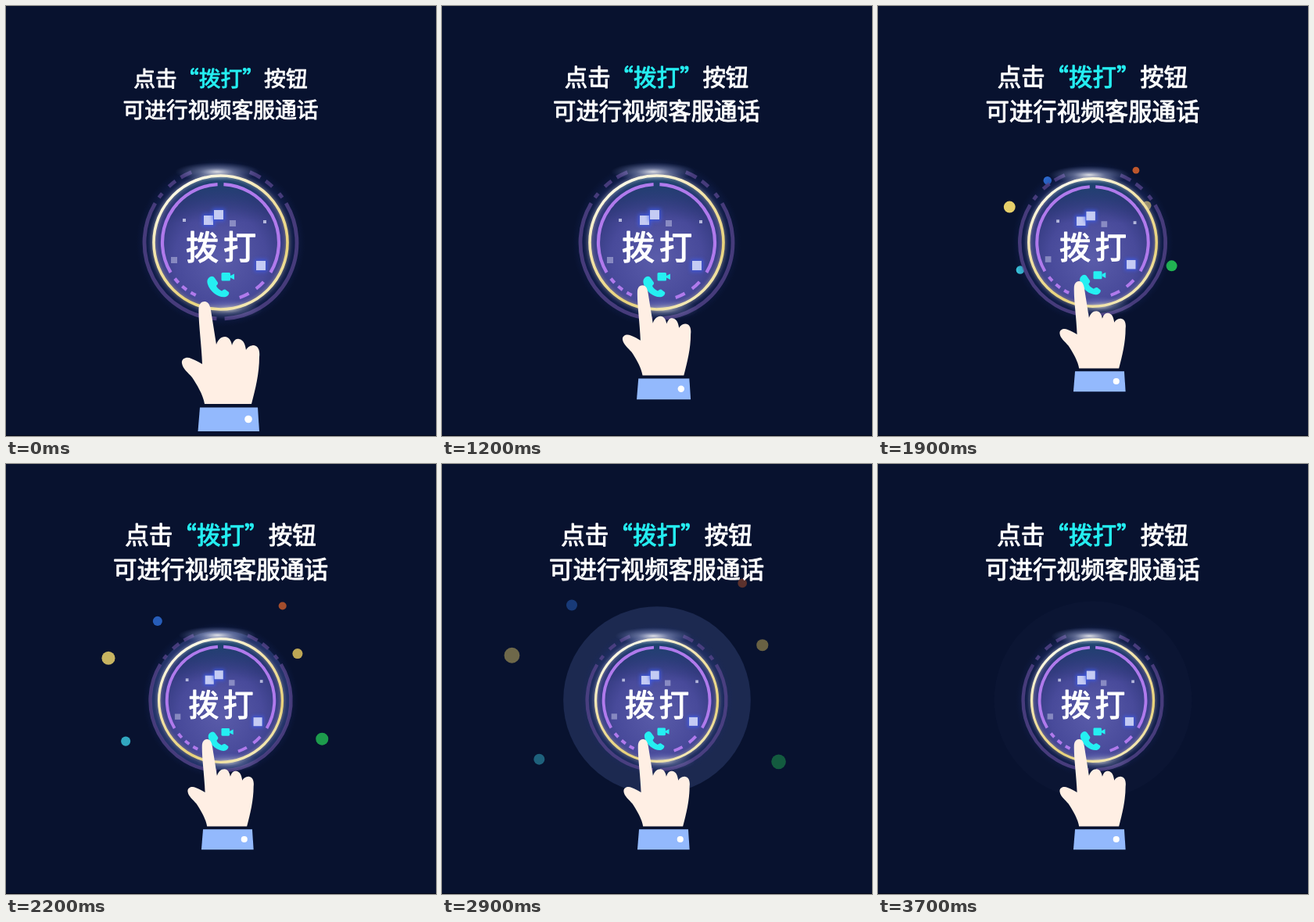
An HTML page for the animation above (3.8 s loop, 550 by 550 pixels).

```html
<!DOCTYPE html>
<html lang="zh-CN">
<head>
<meta charset="utf-8">
<title>拨打</title>
<style>
html, body { margin: 0; width: 100%; height: 100%; overflow: hidden; background: #08122f; }
svg { display: block; width: 100vw; height: 100vh; }
text, tspan { fill: currentColor; stroke: currentColor; }
text { font-family: "Noto Sans CJK SC", "Noto Sans CJK", sans-serif; color: #fff; stroke-width: .9; stroke-linejoin: round; }
.cyan { color: #25eff2; fill: #25eff2; }
</style>
</head>
<body>
<svg viewBox="0 0 550 550" lang="zh-CN">
  <defs>
    <radialGradient id="disc" cx=".5" cy=".62" r=".62">
      <stop offset="0" stop-color="#5a5caa"/>
      <stop offset=".55" stop-color="#484a9a"/>
      <stop offset="1" stop-color="#26306e"/>
    </radialGradient>
    <linearGradient id="teal" x1="0" y1="0" x2="0" y2="1">
      <stop offset="0" stop-color="#1b4a70" stop-opacity=".9"/>
      <stop offset=".35" stop-color="#1f2c66" stop-opacity="0"/>
    </linearGradient>
    <linearGradient id="gold" x1=".2" y1="0" x2=".75" y2="1">
      <stop offset="0" stop-color="#fffdf2"/>
      <stop offset=".4" stop-color="#f3e3a6"/>
      <stop offset=".75" stop-color="#e8d27a"/>
      <stop offset="1" stop-color="#f6edc0"/>
    </linearGradient>
    <radialGradient id="aura">
      <stop offset=".78" stop-color="#2c3f92" stop-opacity=".55"/>
      <stop offset="1" stop-color="#14245c" stop-opacity="0"/>
    </radialGradient>
    <radialGradient id="shine">
      <stop offset="0" stop-color="#fff" stop-opacity=".85"/>
      <stop offset=".4" stop-color="#c4cdf0" stop-opacity=".4"/>
      <stop offset="1" stop-color="#8f9fe0" stop-opacity="0"/>
    </radialGradient>
    <filter id="soft" x="-1" y="-1" width="3" height="3"><feGaussianBlur stdDeviation="2.5"/></filter>
    <filter id="edge" x="-.5" y="-.5" width="2" height="2"><feGaussianBlur stdDeviation=".7"/></filter>
  </defs>
  <rect width="550" height="550" fill="#08122f"/>
  <rect y="549" width="550" height="1" fill="#04081a"/>
  <circle id="halo" cx="275" cy="302" fill="#82a0ff"/>
  <g id="dots"></g>
  <g id="button">
    <circle cx="274.5" cy="302.5" r="108" fill="url(#aura)"/>
    <g id="outer" fill="none" stroke="#55448a" stroke-width="4.8" opacity=".8" filter="url(#edge)"></g>
    <circle cx="274.5" cy="302.5" r="86" fill="url(#disc)"/>
    <circle cx="274.5" cy="302.5" r="86" fill="url(#teal)"/>
    <ellipse cx="270" cy="212" rx="54" ry="12" fill="url(#shine)"/>
    <ellipse cx="285" cy="388" rx="44" ry="13" fill="url(#shine)" opacity=".6"/>
    <g fill="none" stroke="url(#gold)">
      <circle cx="274.5" cy="302.5" r="85.5" stroke-width="5" opacity=".4" filter="url(#soft)"/>
      <circle cx="274.5" cy="302.5" r="85.5" stroke-width="3.6" filter="url(#edge)"/>
    </g>
    <g id="inner" fill="none" stroke="#b07aec" stroke-width="4.2" filter="url(#edge)"></g>
    <g id="squares"></g>
    <text x="230" y="323.5" font-size="42" letter-spacing="6" style="stroke-width:1.4">拨打</text>
    <g class="cyan">
      <path d="M259 348C262 345 265 345 267 348L270.500 353C272 355 270 357 269 358C270 361 273 363 276 364.500C278 363 279 362 281 363L285 366C286 368 284 371 281 372C273 374 261 366 258 356C257 353 257 350 259 348Z"/>
      <rect x="275.500" y="341" width="11.500" height="10.500" rx="1.500"/>
      <path d="M287 345L292 342.500V350L287 347.500Z"/>
    </g>
  </g>
  <g id="title" text-anchor="middle" font-size="27.8">
    <text x="274.500" y="102.800">点击<tspan class="cyan">“拨打”</tspan>按钮</text>
    <text x="274.500" y="143.300">可进行视频客服通话</text>
  </g>
  <g id="hand">
    <path fill="#ffefe4" d="M254 509C252 497 244 484 238 475C233 469 226 464 225 457C224 451 231 448 237 451C243 453 247 456 251 458C250 432 246 405 246.500 388C246.500 381 250 378 254 378C259 378 261 383 262 389L269 433C271 427 275 423 280 423C285 423 288 428 289 434C291 428 294 425 298 426C304 427 306 433 307 440C309 436 313 434 317 434C323 435 325 441 324 449C324 470 319 490 314 509Z"/>
    <path fill="#93b9fd" d="M248 513.500H322L324 544H245.500Z"/>
    <circle cx="310" cy="528.500" r="4.800" fill="#fff"/>
  </g>
</svg>
<script>
const LOOP = 3800, STEP = 100, CX = 275, CY = 302;
const $ = id => document.getElementById(id);
const ramp = (t, a, b) => Math.min(1, Math.max(0, (t - a) / (b - a)));

function set(el, attrs) {
  for (const k in attrs) el.setAttribute(k, attrs[k]);
  return el;
}

function add(parent, tag, attrs) {
  const el = document.createElementNS("http://www.w3.org/2000/svg", tag);
  return $(parent).appendChild(set(el, attrs));
}

// Angles in degrees, clockwise from the right
function arc(ring, mid, span) {
  const at = deg => {
    const a = deg * Math.PI / 180;
    return `${274.5 + ring.r * Math.cos(a)} ${302.5 + ring.r * Math.sin(a)}`;
  };
  add(ring.id, "path", { d: `M${at(mid - span / 2)}A${ring.r} ${ring.r} 0 0 1 ${at(mid + span / 2)}` });
}

function dashes(ring, n, first, step, span, grow = 0) {
  for (let i = 0; i < n; i++) arc(ring, first + step * i, span + grow * i);
}

const outer = { id: "outer", r: 97.5 }, inner = { id: "inner", r: 74.5 };
dashes(outer, 2, 152, -124, 118);
dashes(outer, 3, 218, 12.5, 4, 2.5);
dashes(outer, 3, -38, -12.5, 4, 2.5);
dashes(inner, 2, 208, -236, 118);
dashes(inner, 3, 139, -10.5, 5.5);
dashes(inner, 2, 47.5, 18.5, 10);

function squares(size, opacity, glow, ...points) {
  const box = (x, y, s, more) =>
    add("squares", "rect", { x: x - s / 2, y: y - s / 2, width: s, height: s, ...more });
  for (const [x, y] of points) {
    if (glow) box(x, y, size + 4, { fill: "#3a5cf0", opacity: .7, filter: "url(#soft)" });
    box(x, y, size, { fill: "#e6e9fc", opacity, filter: "url(#edge)" });
  }
}
squares(12, .8, true, [259, 274], [272, 267], [326, 332]);
squares(8, .4, false, [290, 278], [215, 325]);
squares(4, .7, false, [228, 274], [331, 276]);

// Bezier flights from the button's centre: bend point, end point, final radius
const dots = [
  { fill: "#e6cf6a", bend: [-115, -61], end: [-194, -57], size: 10.2 },
  { fill: "#2c6ad0", bend: [-58, -94], end: [-115, -125], size: 7.2 },
  { fill: "#bd572c", bend: [51, -105], end: [116, -155], size: 6 },
  { fill: "#dcc05c", bend: [65, -57], end: [143, -72], size: 7.8 },
  { fill: "#38c0d8", bend: [-107, 30], end: [-156, 81], size: 7.2 },
  { fill: "#21b352", bend: [120, 17], end: [160, 86], size: 9.6 }
];
for (const d of dots) d.el = add("dots", "circle", { fill: d.fill });

function zoom(id, x, y, s) {
  $(id).setAttribute("transform", `translate(${x} ${y}) scale(${s}) translate(${-x} ${-y})`);
}

function draw(t) {
  zoom("title", 274.5, 113, 1 + .1 * ramp(t, 0, 2000));
  zoom("hand", CX, 205, 1 - .15 * ramp(t, 0, 1500));
  zoom("button", CX, CY, 1 - .088 * ramp(t, 1500, 2300));

  // Burst: dots and halo share one cubic ease-out
  const p = 1 - (1 - ramp(t, 1400, LOOP)) ** 3;
  set($("halo"), { r: 126.5 * p, opacity: .23 * Math.min(1, (LOOP - t) / 1300) });
  const fade = 1 - ramp(t, 1950, 3700);
  for (const { el, bend, end, size } of dots) {
    const along = k => 2 * p * (1 - p) * bend[k] + p * p * end[k];
    set(el, { cx: CX + along(0), cy: CY + along(1), r: size * (.45 + .55 * p), opacity: fade });
  }
}

const start = performance.now();
function tick() {
  const t = (performance.now() - start) % LOOP;
  draw(Math.floor(t / STEP) * STEP);
  requestAnimationFrame(tick);
}
tick();
</script>
</body>
</html>
```
